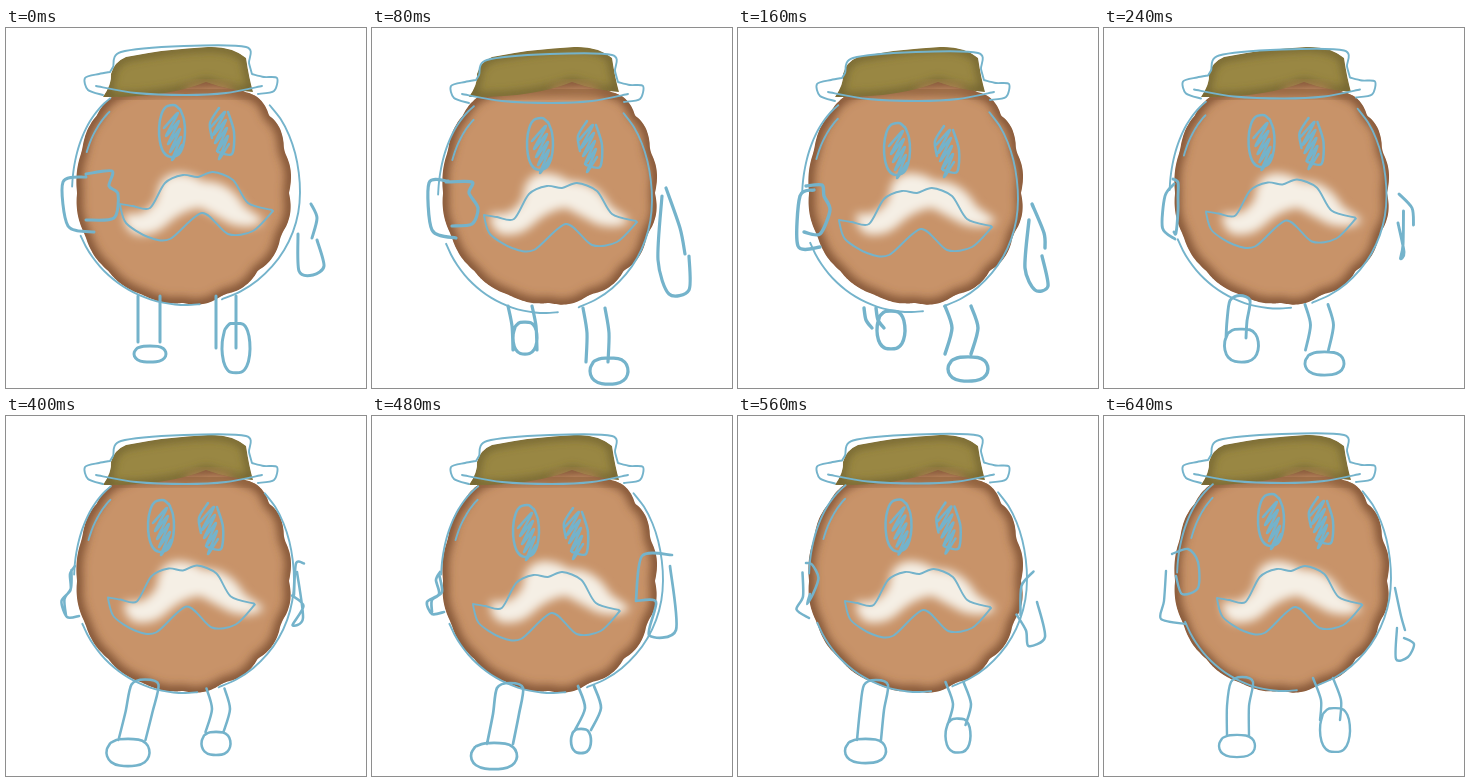
An HTML page that plays this animation: 360x360 px, repeating every 720 ms.

```html
<!DOCTYPE html>
<html lang="en">
<head>
<meta charset="utf-8">
<title>Sketched walk</title>
<style>
html, body { margin: 0; width: 100%; height: 100%; overflow: hidden; background: #fff; }
svg { display: block; width: 100%; height: 100%; }
.ink { fill: none; stroke: #74b3cb; stroke-linecap: round; stroke-linejoin: round; }
</style>
</head>
<body>
<svg viewBox="0 0 360 360">
  <defs>
    <filter id="soft" x="-20%" y="-20%" width="140%" height="140%"><feGaussianBlur stdDeviation="5"/></filter>
    <path id="body"/>
    <path id="hat" d="M97 69Q106 56 105 46Q108 34 120 29Q160 21 202 19Q226 18 240 30Q243 50 247 64Q222 62 200 54Q160 70 97 69Z"/>
    <clipPath id="inBody"><use href="#body"/></clipPath>
    <clipPath id="inHat"><use href="#hat"/></clipPath>
  </defs>
  <g clip-path="url(#inBody)">
    <use href="#body" fill="#c89369"/>
    <use href="#body" fill="none" stroke="#7d5030" stroke-width="11" filter="url(#soft)"/>
    <path d="M90 70Q170 58 255 66" fill="none" stroke="#94653f" stroke-width="10" filter="url(#soft)"/>
  </g>
  <g clip-path="url(#inHat)">
    <use href="#hat" fill="#998743"/>
    <use href="#hat" fill="none" stroke="#665929" stroke-width="6" filter="url(#soft)"/>
    <ellipse cx="203" cy="63" rx="24" ry="8" fill="#b18452" filter="url(#soft)"/>
  </g>
  <path d="M119 185Q140 190 151 170Q152 146 173 145Q188 146 196 153Q224 152 238 178L258 192Q248 203 224 196L194 180Q178 182 165 193Q148 211 128 206Q116 199 119 185Z" fill="#f5efe5" filter="url(#soft)"/>
  <g class="ink"><path id="thin" stroke-width="1.9"/><path id="bold"/><path id="eyes" stroke-width="2.5"/></g>
</svg>
<script>
// One row per key pose.
// hat dy, shell cx cy rx, eyes dx dy, moustache dx dy scale, line weight
const face = [
  [-1, 180, 165, 114, 0, 0, 2, -11, 1, 3],
  [7, 173, 173, 107, 2, 13, 0, 0, 1, 3.2],
  [5, 172, 172, 108, -7, 18, -11, 5, 1, 3.4],
  [0, 176, 165, 109, -10, 2, -9, -12, .96, 2.4],
  [0, 180, 165, 111, -12, 12, -11, 1, .96, 2.7],
  [-1, 180, 163, 107, 1, 1, 1, -5, .95, 2.4]
];
const leftArm = [
  [80,146, 106,143, 103,158, 112,166, 108,190, 80,192, 80,149, 57,154, 62,198, 88,204],
  [74,154, 100,154, 97,165, 106,180, 100,196, 80,198, 76,153, 57,155, 60,202, 84,210],
  [68,158, 84,157, 86,168, 92,182, 82,206, 66,204, 76,162, 62,168, 60,218, 82,219],
  [70,144, 64,152, 62,170, 56,184, 62,204, 74,204, 64,150, 60,168, 57,182, 60,203],
  [68,156, 64,164, 67,178, 55,186, 60,198, 72,196, 67,158, 70,176, 60,184, 60,196],
  [68,138, 84,133, 94,146, 94,172, 78,178, 72,160, 62,155, 60,185, 57,203, 82,208]
];
const rightArm = [
  [305,176, 311,190, 306,210, 292,206, 293,243, 307,247, 318,238, 311,212],
  [294,160, 308,200, 313,226, 290,168, 286,232, 297,266, 317,262, 317,228],
  [294,176, 306,205, 307,220, 291,192, 287,240, 297,262, 310,258, 304,228],
  [296,156, 310,155, 312,174, 308,174, 311,194, 296,199, 290,190, 284,162],
  [300,139, 270,140, 264,184, 264,185, 284,186, 277,219, 304,214, 298,150],
  [291,172, 297,200, 301,214, 293,212, 292,243, 304,241, 310,228, 300,222]
];
// hip, knee, ankle, half width, foot centre and radii
const leftLeg = [
  [143,268, 143,292, 143,314, 11, 144,326, 16,8],
  [148,278, 152,298, 153,322, 12, 153,310, 12,16],
  [132,280, 134,292, 140,300, 6, 153,302, 14,19],
  [140,265, 132,294, 124,320, 14, 122,333, 20,14],
  [138,272, 134,298, 128,328, 13, 122,340, 23,13],
  [138,266, 134,290, 134,320, 11, 133,330, 18,11]
];
const rightLeg = [
  [220,268, 220,290, 220,320, 10, 230,320, 14,25],
  [222,280, 226,305, 225,334, 11, 237,343, 19,13],
  [220,278, 227,300, 220,326, 13, 230,341, 20,12],
  [205,275, 209,294, 206,318, 10, 211,330, 19,11],
  [214,270, 221,292, 211,314, 8, 209,325, 10,12],
  [219,262, 227,284, 226,304, 10, 231,314, 15,22]
];
const hatLines = [
  [104,45, 107,40, 115,25, 178,19, 240,20, 243,36, 246,47],
  [104,45, 93,47, 79,51, 82,63, 97,68],
  [246,47, 258,50, 271,51, 268,64, 252,67],
  [90,59, 130,66, 180,68, 220,66, 256,59]
];
const whiskers = [
  [112,187, 125,189, 142,191, 157,166, 175,158, 190,160, 205,155, 225,163, 240,186, 264,193],
  [112,188, 118,206, 140,220, 162,222, 194,196, 220,217, 245,214, 265,194]
];
// Key pose for each 80 ms step; halves lie midway between two poses.
const steps = [0, 1, 2, 2.5, 3, 3.5, 4, 4.5, 5];

const el = id => document.getElementById(id);
const at = (rows, k) => rows[Math.floor(k)].map((v, i) => v + (rows[Math.ceil(k)][i] - v) * (k % 1));
const shift = (s, dx, dy) => s.map((v, i) => v + (i % 2 ? dy : dx));

// Smooth curve through the points of one stroke.
function curve(s) {
  const n = s.length / 2;
  const pt = i => { i = Math.max(0, Math.min(n - 1, i)); return [s[2 * i], s[2 * i + 1]]; };
  let d = 'M' + pt(0);
  for (let i = 0; i < n - 1; i++) {
    const [p, a, b, q] = [pt(i - 1), pt(i), pt(i + 1), pt(i + 2)];
    d += 'C' + a.map((v, j) => v + (b[j] - p[j]) / 7) + ' ' + b.map((v, j) => v - (q[j] - a[j]) / 7) + ' ' + b;
  }
  return d;
}

// Arc of an oval; upper and lower set how square each half is.
function arc(cx, cy, rx, ry, from, to, upper = 1, lower = 1, n = 12, bump = () => 1) {
  const s = [];
  for (let i = 0; i <= n; i++) {
    const a = from + (to - from) * i / n, c = Math.cos(a), y = Math.sin(a), r = bump(a);
    s.push(cx + rx * r * Math.sign(c) * Math.abs(c) ** (y < 0 ? upper : lower), cy + ry * r * y);
  }
  return s;
}

function shell(cx, cy, rx) {
  const part = (from, to, inset = 0) => arc(cx, cy, rx - inset, 112 - inset, from, to, .65);
  return [part(2.75, 1.45), part(3.2, 4.15), part(-.9, 1.25), part(3.55, 4.05, 9)];
}

function leg([hx, hy, kx, ky, ax, ay, w, fx, fy, rx, ry], arched) {
  const left = [ax - w, ay, kx - w, ky, hx - w, hy], right = [hx + w, hy, kx + w, ky, ax + w, ay];
  const sides = arched ? [[...left, hx, hy - 5, ...right]] : [left, right];
  return [...sides, arc(fx, fy, rx, ry, -2.3, 3.9, .6, .7)];
}

function hatch(x, y) {
  const s = [];
  for (let i = 0; i < 5; i++) s.push(x + 2 * i, y + 8 * i, x + 14 + i, y - 15 + 8 * i);
  return s;
}

const show = (id, strokes) => el(id).setAttribute('d', strokes.map(curve).join(''));
const scallop = a => 1 + (Math.cos(a) > 0 ? .028 : .012) * Math.abs(Math.sin(8 * a));
show('body', [arc(177, 165, 106, 110, 0, 2 * Math.PI, .6, 1, 120, scallop)]);
show('eyes', [
  arc(166, 103, 13, 26, -1, 5.4, .8, .8), hatch(158, 100),
  hatch(205, 99), [222,84, 228,104, 226,126, 212,124], [213,80, 204,95, 206,110]
]);

let shown = -1;
function draw() {
  const step = Math.floor(performance.now() % 720 / 80);
  if (step !== shown) {
    const k = steps[shown = step];
    const [hatY, cx, cy, rx, ex, ey, mx, my, scale, weight] = at(face, k);
    const l = at(leftArm, k), r = at(rightArm, k);
    show('thin', [
      ...hatLines.map(s => shift(s, 0, hatY)),
      ...shell(cx, cy, rx),
      ...whiskers.map(s => shift(s.map((v, i) => i % 2 ? v : 112 + (v - 112) * scale), mx, my))
    ]);
    show('bold', [
      l.slice(0, 12), l.slice(12), r.slice(0, 6), r.slice(6),
      ...leg(at(leftLeg, k), k > 2), ...leg(at(rightLeg, k), false)
    ]);
    el('bold').setAttribute('stroke-width', weight);
    el('eyes').setAttribute('transform', `translate(${ex} ${ey})`);
  }
  requestAnimationFrame(draw);
}
draw();
</script>
</body>
</html>
```
